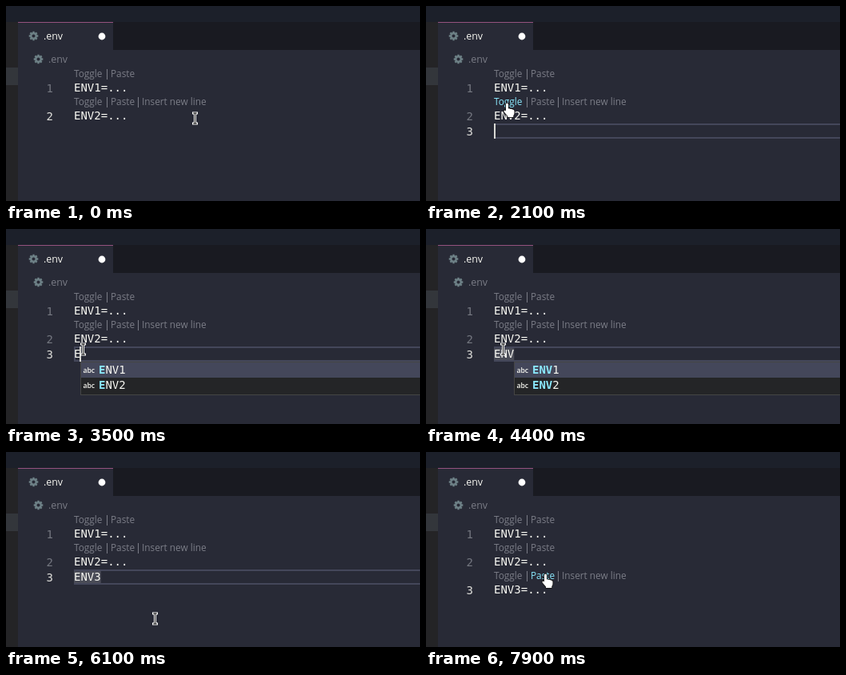
An HTML page with a canvas that plays this animation: 518 px wide and 244 px high, repeating every 8000 ms.

```html
<!DOCTYPE html>
<html lang="en">
<head>
<meta charset="utf-8">
<title>Editor</title>
<style>
html, body { margin: 0; width: 518px; height: 244px; overflow: hidden; background: #282a36 }
canvas { display: block }
</style>
</head>
<body>
<canvas width="518" height="244"></canvas>
<script>
const ctx = document.querySelector('canvas').getContext('2d');
const LOOP = 8000, STEP = 100, CHAR = 8.43, LEFT = 85;
const FOCUS = 1000, ACCEPT = 6800, BLUR = 7900, DELAY = 300, BLINK = 500;
const UI = '"Open Sans", "Noto Sans", sans-serif';
const MONO = '14px "DejaVu Sans Mono", monospace';
const BG = '#282a36', LINE = '#44475a', CYAN = '#8be9fd', DIM = '#7b7d87', FG = '#f8f8f2';

const moves = [
  { from: 200, to: 500, x: 232, y: 115 },
  { from: 1000, to: 1900, x: 102, y: 122 },
  { from: 2400, to: 2900, x: 96, y: 150 },
  { from: 5200, to: 5600, x: 186, y: 208 },
  { from: 7000, to: 7500, x: 150, y: 153 }
];
const edits = [
  [FOCUS, ''], [3500, 'E'], [3700, 'EN'], [3900, 'ENV'],
  [4600, 'ENV3'], [6500, 'ENV3='], [ACCEPT, 'ENV3=...']
];
const links = [['Toggle', 85, 122], ['Paste', 131, 161], ['Insert new line', 170, 250]];
const hand = new Path2D('M-2 1.5Q-2 -.5 -.5 -.5T1 1.5V6.5Q2.3 5.8 3.5 6.9Q4.8 6.3 6 7.5Q8 7.2 8.5 9V12Q8.5 14 7.3 15V17H0V15.5L-4.3 10.5Q-5 8.7 -3.6 8.4Q-2.8 8.4 -2 9.5Z');
const beam = new Path2D('M-1.5 -6H2.5M.5 -6V7M-1.5 7H2.5');

function rect(x, y, w, h, color) {
  ctx.fillStyle = color;
  ctx.fillRect(x, y, w, h);
}

function text(s, x, y, color, font = MONO) {
  ctx.font = font;
  ctx.fillStyle = color;
  ctx.fillText(s, x, y);
}

function disc(x, y, r, color) {
  ctx.fillStyle = color;
  ctx.beginPath();
  ctx.arc(x, y, r, 0, 7);
  ctx.fill();
}

function gear(x, y) {
  const color = '#6d8086';
  ctx.strokeStyle = color;
  ctx.lineWidth = 2.4;
  ctx.beginPath();
  for (let i = 0; i < 4; i++) {
    const c = 5.8 * Math.cos(i * Math.PI / 4), s = 5.8 * Math.sin(i * Math.PI / 4);
    ctx.moveTo(x - c, y - s);
    ctx.lineTo(x + c, y + s);
  }
  ctx.stroke();
  disc(x, y, 4.5, color);
  disc(x, y, 2, BG);
}

function pointerAt(t) {
  let x = 236, y = 140;
  for (const m of moves) {
    const k = Math.min(1, Math.max(0, (t - m.from) / (m.to - m.from)));
    x += (m.x - x) * k;
    y += (m.y - y) * k;
  }
  return { x, y };
}

// Draws one row of links and tells whether the pointer is on one of them.
function lens(top, count, p) {
  let over = false;
  links.slice(0, count).forEach(([label, a, b], i) => {
    const hit = p.x >= a && p.x <= b && p.y >= top && p.y < top + 14;
    over = over || hit;
    text(label, a, top + 11, hit ? CYAN : DIM, '11.8px ' + UI);
    if (i) rect(a - 5, top + 1, 1, 13, DIM);
  });
  return over;
}

function codeLine(n, s, base, active) {
  text(n, 50.5, base + 1, active ? '#e0e0dc' : '#747780');
  text(s, LEFT, base, FG);
}

function popup(s) {
  const x = Math.round(LEFT + s.length * CHAR);
  rect(x, 166, 518, 42, '#454545');
  rect(x + 1, 167, 518, 40, '#242527');
  rect(x + 1, 167, 518, 19, LINE);
  ['ENV1', 'ENV2'].forEach((word, i) => {
    const y = 181 + i * 19;
    text('abc', x + 3.5, y - 1, FG, '600 8.6px ' + UI);
    text(s, x + 23, y, CYAN, 'bold ' + MONO);
    text(word.slice(s.length), x + 23 + s.length * CHAR, y, FG);
  });
}

function chrome() {
  rect(0, 0, 518, 244, BG);
  rect(0, 0, 518, 20, '#1c202a');
  rect(0, 20, 15, 224, '#242426');
  rect(0, 77, 15, 22, '#33363b');
  rect(134, 20, 384, 35, '#191a21');
  rect(15, 20, 119, 1, '#94527e');
  gear(34.5, 37.5);
  text('.env', 47, 42, FG, '12.4px ' + UI);
  disc(120, 38, 4.4, '#fff');
  gear(40.5, 66.5);
  text('.env', 53, 71, DIM, '12.4px ' + UI);
}

function outlined(shape, width, color) {
  ctx.lineWidth = width;
  ctx.strokeStyle = color;
  ctx.stroke(shape);
}

function pointer({ x, y }, isHand) {
  ctx.save();
  ctx.translate(Math.round(x), Math.round(y));
  ctx.lineJoin = 'round';
  if (isHand) {
    outlined(hand, 1.6, '#111');
    ctx.fillStyle = '#fff';
    ctx.fill(hand);
  } else {
    ctx.lineCap = 'square';
    outlined(beam, 3, '#fff');
    outlined(beam, 1, '#111');
  }
  ctx.restore();
}

function draw(t) {
  const p = pointerAt(t);
  const [edited, line] = edits.filter(e => e[0] <= t).pop() || [0, ''];
  const idle = t - edited;
  const added = t >= FOCUS, focused = added && t < BLUR, done = t >= ACCEPT;
  const top = done ? 163 : 147;

  chrome();
  let over = lens(78, 2, p);
  over = lens(113, t >= ACCEPT + DELAY ? 2 : 3, p) || over;
  if (done) over = lens(148, 3, p) || over;

  if (focused) {
    rect(LEFT, top, 440, 19, LINE);
    rect(LEFT + 2, top + 2, 440, 15, BG);
  }
  // The word under the caret lights up once typing pauses.
  if (/\w$/.test(line) && idle >= DELAY) rect(LEFT, top + 2, line.length * CHAR, 15, '#4a4c57');

  codeLine(1, 'ENV1=...', 107, false);
  codeLine(2, 'ENV2=...', 142, !added);
  if (added) codeLine(3, line, top + 14, true);
  if (focused && idle % (2 * BLINK) < BLINK) {
    const col = Math.min(line.length, 5);
    rect(Math.max(LEFT, Math.round(LEFT + col * CHAR - 1)), top, 2, 19, '#d8d8d4');
  }
  if (/^E(NV?)?$/.test(line)) popup(line);
  pointer(p, over);
}

const start = performance.now();
function tick() {
  const t = (performance.now() - start) % LOOP;
  draw(Math.floor(t / STEP) * STEP);
  requestAnimationFrame(tick);
}
tick();
</script>
</body>
</html>
```
